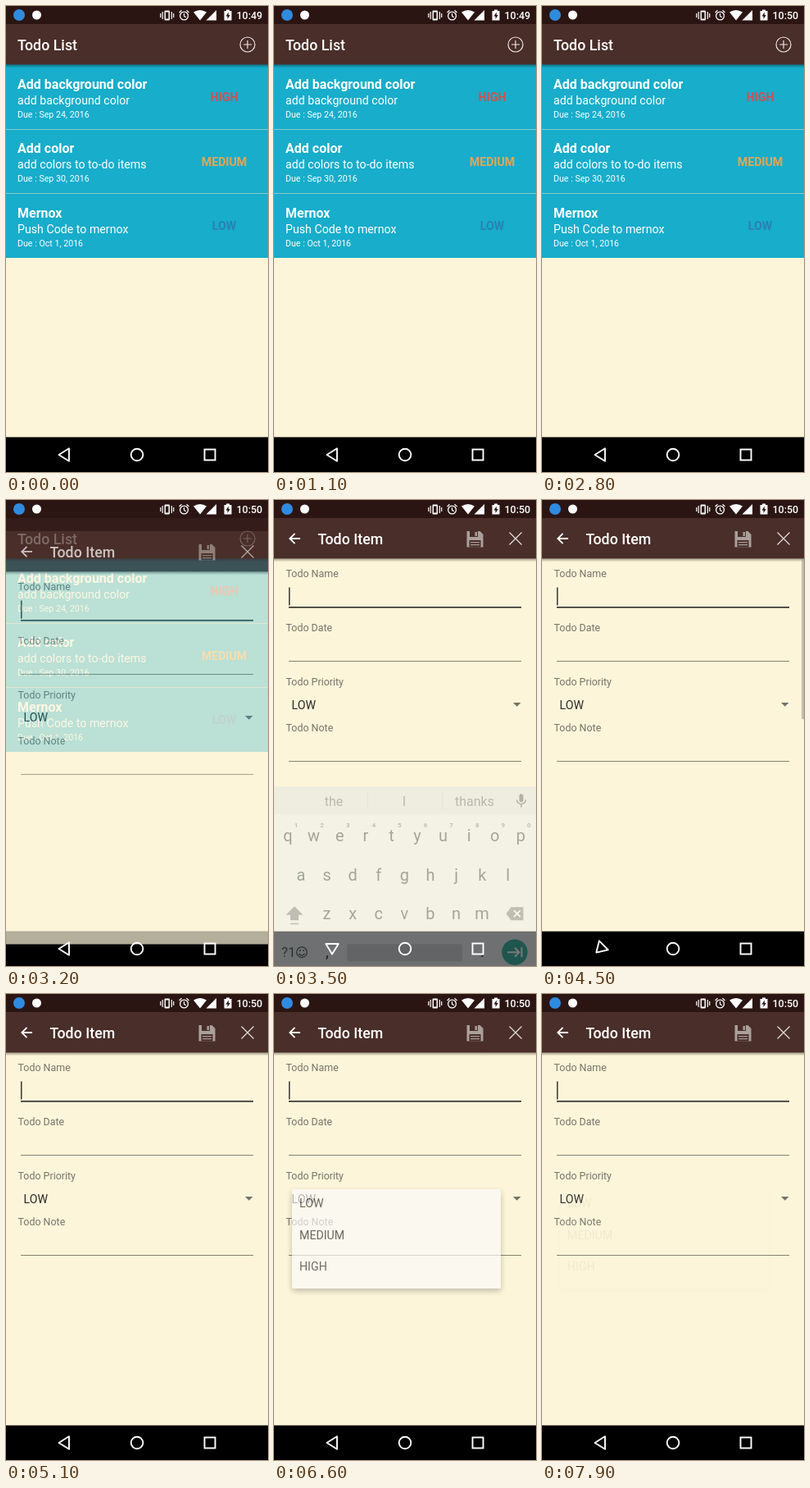
These frames come from a looping animation (320 by 568 pixels, 8 s). An HTML page:

```html
<!DOCTYPE html>
<html lang="en">
<head>
<meta charset="utf-8">
<title>Todo List</title>
<style>
  html, body { margin: 0; width: 100%; height: 100%; overflow: hidden; background: #000; }
  svg { display: block; width: 100vw; height: 100vh; font-family: Roboto, sans-serif; }
  .title { font-size: 17.8px; font-weight: 500; fill: #fff; }
  .name { font-size: 16px; font-weight: 700; fill: #fff; }
  .body { font-size: 14.2px; fill: #fff; }
  .due { font-size: 10.67px; fill: #fff; }
  .priority { font-size: 14.2px; font-weight: 700; text-anchor: middle; }
  .label { font-size: 12.44px; fill: #77736a; }
  .value { font-size: 14.2px; fill: #2a2925; }
  .key { font-size: 20px; fill: #414e55; text-anchor: middle; }
  .hint { font-size: 8px; font-weight: 700; fill: #7a868d; text-anchor: middle; }
  .word { font-size: 16px; fill: #6b777e; text-anchor: middle; }
  .clock { font-size: 12.44px; font-weight: 500; fill: #fff; }
  .line { fill: none; stroke: #fff; }
  .bar { fill: #2b1513; }
</style>
</head>
<body>
<svg viewBox="0 0 320 568">
  <defs>
    <linearGradient id="shade" x2="0" y2="1">
      <stop stop-opacity=".35"/><stop offset="1" stop-opacity="0"/>
    </linearGradient>
    <filter id="lift" x="-10%" y="-10%" width="120%" height="130%">
      <feDropShadow dx="0" dy="3" stdDeviation="3.5" flood-opacity=".35"/>
    </filter>
  </defs>

  <rect width="320" height="568"/>

  <g id="listScreen">
    <rect width="320" height="525.500" fill="#fdf5d9"/>
    <rect y="71" width="320" height="236" fill="#17adcb"/>
    <g id="items"></g>
    <rect class="bar" width="320" height="22"/>
    <rect y="22" width="320" height="49.500" fill="#4a2e29"/>
    <rect y="71.500" width="320" height="4" fill="url(#shade)"/>
    <text class="title" x="14" y="54">Todo List</text>
    <g class="line" stroke-width="1.2" opacity=".88">
      <circle cx="295" cy="47" r="9"/><path d="M290 47h10M295 42v10"/>
    </g>
  </g>

  <g id="formScreen">
    <rect width="320" height="525.500" fill="#fdf5d9"/>
    <rect class="bar" width="320" height="22"/>
    <rect y="22" width="320" height="49.500" fill="#4a2e29"/>
    <rect y="71.500" width="320" height="4" fill="url(#shade)"/>
    <path class="line" d="M32 47H19.500M25.500 40.800L19.300 47L25.500 53.200" stroke-width="1.8"/>
    <text class="title" x="53.500" y="54">Todo Item</text>
    <path d="M235.500 38h16l4 4v15.500h-20z" fill="#aaa09b"/>
    <path d="M239 38h10v7h-10zM238.500 49h14v8.500h-14z" fill="#4a2e29"/>
    <path d="M245.500 39h2.500v5h-2.500zM240 51h11v1.300h-11zM240 54h11v1.300h-11z" fill="#aaa09b"/>
    <path class="line" d="M287.500 39.500l15 15m0-15l-15 15" stroke-width="1.2" opacity=".85"/>
    <g id="labels"></g>
    <rect x="18" y="130" width="284" height="1.600" fill="#2b2a27"/>
    <path d="M18 196.500h284M18 318.500h284" stroke="#85816f"/>
    <text class="value" x="21.500" y="254.500">LOW</text>
    <path d="M292 247h9.500l-4.750 4.800z" fill="#757167"/>
    <rect id="cursor" x="18" y="106.500" width="1.500" height="22" fill="#383631"/>
    <rect id="scrollbar" x="317" y="72" width="3" height="195" fill="#aaa498"/>
  </g>

  <g id="popup">
    <rect x="22" y="238" width="255" height="121" rx="2" fill="#fafafa" filter="url(#lift)"/>
    <g id="options"></g>
  </g>

  <g id="keyboard">
    <rect y="295" width="320" height="230.500" fill="#eceff1"/>
    <rect y="295" width="320" height="34" fill="#e1e6e9"/>
    <path d="M114.500 302v21M205.500 302v21" stroke="#cad0d4"/>
    <g id="keys"></g>
    <g fill="none" stroke="#5f6a70" stroke-width="1.500">
      <rect x="299.500" y="304" width="5" height="10" rx="2.500" fill="#5f6a70" stroke="none"/>
      <path d="M296.500 311a5.500 5.500 0 0 0 11 0M302 316.500v4"/>
      <circle cx="34" cy="497" r="6.300" stroke-width="1.300"/>
      <path d="M30.700 498.500a3.500 3.500 0 0 0 6.600 0" stroke-width="1.300"/>
    </g>
    <path d="M31 494h1.800v1.800h-1.800zM35.300 494h1.800v1.800h-1.800z" fill="#5f6a70"/>
    <path d="M25 441l10.500 10.500h-5.500v6.500h-10v-6.500h-5.500zM20 461.500h10v1.500h-10z" fill="#788287"/>
    <path d="M283.500 450l6-8h15v16h-15z" fill="#788287"/>
    <path class="line" d="M293 446l8 8m0-8l-8 8" stroke-width="1.700"/>
    <rect x="89" y="487" width="141" height="21" rx="2" fill="#d0d5d8"/>
    <circle cx="294" cy="497" r="15.700" fill="#43b5a6"/>
    <path class="line" d="M285 497h14M294 491.500l5.500 5.500l-5.500 5.500M302.500 491v12" stroke-width="2"/>
  </g>

  <g id="navigation" class="line" stroke-width="1.900">
    <path id="back" d="M64.500 547L77 539.300V554.700Z" stroke-linejoin="round"/>
    <circle cx="160" cy="547" r="7.300"/>
    <rect x="242.500" y="540.500" width="13" height="13"/>
  </g>

  <g id="status" fill="#fff">
    <circle cx="16" cy="11" r="7" fill="#2f8be0"/>
    <circle cx="37.500" cy="11" r="5.500"/>
    <rect x="193.500" y="5.500" width="6.500" height="12" rx="1"/>
    <rect class="bar" x="195" y="7.500" width="3.500" height="8"/>
    <path class="line" d="M191.200 7v9M188.800 9v5M202.300 7v9M204.700 9v5" stroke-width="1.200"/>
    <circle class="line" cx="217.500" cy="12" r="4.900" stroke-width="1.300"/>
    <path class="line" d="M217.500 9v3.300l2.300 1.500M211.500 8l3-2.700M223.500 8l-3-2.700" stroke-width="1.200"/>
    <path d="M229 7.500q8-5 16 0l-8 10z"/>
    <path d="M257 5v12.500h-12.500z"/>
    <path d="M266.500 6h2.500v-1.500h4v1.500h2.500v11.500h-9z"/>
    <path class="bar" d="M271.800 7.500l-3.300 5h2v3.500l3.300-5h-2z"/>
    <text id="clock" class="clock" x="281.500" y="15.500">10:49</text>
  </g>
</svg>

<script>
const LOOP = 8000;
const el = id => document.getElementById(id);
const text = (cls, x, y, value, fill) =>
  `<text class="${cls}" x="${x}" y="${y}"${fill ? ` fill="${fill}"` : ''}>${value}</text>`;

const items = [
  ['Add background color', 'add background color', 'Sep 24, 2016', 'HIGH', '#d0504f'],
  ['Add color', 'add colors to to-do items', 'Sep 30, 2016', 'MEDIUM', '#e5a653'],
  ['Mernox', 'Push Code to mernox', 'Oct 1, 2016', 'LOW', '#2a80b4'],
];
el('items').innerHTML = items.map(([name, note, due, priority, color], i) => {
  const y = 72 + i * 78.5;
  return text('name', 14, y + 28.5, name) + text('body', 14, y + 47.5, note) +
    text('due', 14, y + 63.5, 'Due : ' + due) + text('priority', 266.5, y + 44, priority, color) +
    (i < 2 ? `<rect y="${Math.floor(y + 78)}" width="320" height="1" fill="#8fc9c6"/>` : '');
}).join('');

el('labels').innerHTML = ['Name', 'Date', 'Priority', 'Note']
  .map((name, i) => text('label', 14.5, [94, 160, 226, 282][i], 'Todo ' + name)).join('');

el('options').innerHTML = ['LOW', 'MEDIUM', 'HIGH']
  .map((name, i) => text('value', 31, 260 + i * 38.5, name)).join('');

const keyRow = (letters, x, y) =>
  [...letters].map((letter, i) => text('key', x + i * 31.6, y, letter)).join('');
el('keys').innerHTML =
  keyRow('qwertyuiop', 17, 362) + keyRow('asdfghjkl', 33, 410) + keyRow('zxcvbnm', 64.5, 457) +
  [...'1234567890'].map((digit, i) => text('hint', 27 + i * 31.6, 345, digit)).join('') +
  ['the', 'I', 'thanks'].map((word, i) => text('word', 73 + i * 86, 318.5, word)).join('') +
  '<text x="9" y="503" font-size="17" fill="#5f6a70">?1</text>' +
  text('key', 65, 503, ',') + text('key', 254.5, 503, '.');

const progress = (t, start, length) => Math.min(1, Math.max(0, (t - start) / length));
const decelerate = (p, power) => 1 - (1 - p) ** power;
const within = (t, start, end) => t >= start && t < end;

function place(id, y, opacity) {
  el(id).setAttribute('transform', `translate(0 ${y})`);
  el(id).setAttribute('opacity', opacity);
}

function render(t) {
  el('clock').textContent = t < 1800 ? '10:49' : '10:50';

  const formY = 45.4 * (1 - decelerate(progress(t, 3135, 350), 5));
  place('formScreen', formY, decelerate(progress(t, 3135, 245), 4));

  const enter = progress(t, 3460, 300);
  const exit = progress(t, 4300, 200);
  const keyboardY = 113 * (1 - decelerate(enter, 5) + exit ** 2);
  place('keyboard', keyboardY, decelerate(progress(t, 3460, 150), 2) * (1 - exit));

  const turn = progress(t, 3330, 120) - progress(t, 4400, 200);
  el('back').setAttribute('transform', `rotate(${-90 * turn} 71 547)`);

  const cursorOff = within(t, 3700, 4100) || within(t, 4600, 5100) || within(t, 5600, 6100);
  el('cursor').setAttribute('opacity', cursorOff ? 0 : 1);
  el('scrollbar').setAttribute('opacity', t < 4100 ? 0 : 1 - progress(t, 4400, 300));

  place('popup', 0, t < 7900 ? decelerate(progress(t, 6450, 350), 2) : 0.05);
}

function tick() {
  render(performance.now() % LOOP);
  requestAnimationFrame(tick);
}
tick();
</script>
</body>
</html>
```
